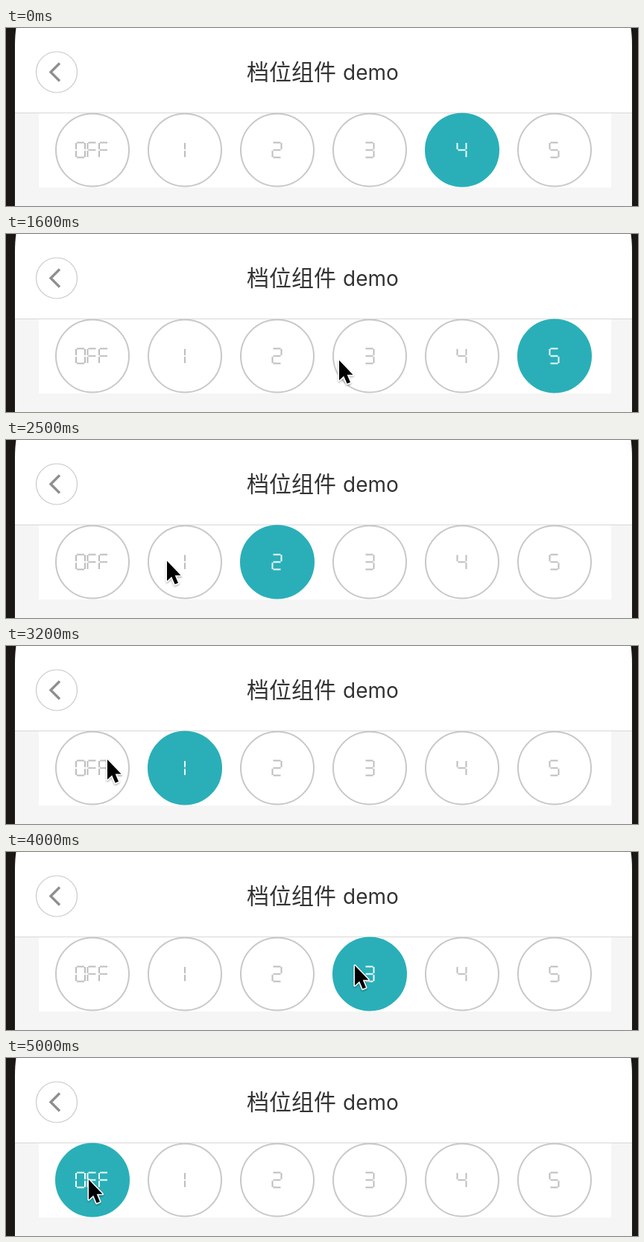
An HTML page for the animation above (5300 ms loop, 848 px wide and 240 px high).

```html
<!DOCTYPE html>
<html lang="zh">
<head>
<meta charset="utf-8">
<title>档位组件 demo</title>
<style>
html, body { margin: 0; width: 100%; height: 100%; overflow: hidden; background: #1a1715; }
svg { display: block; width: 100%; height: 100%; }
.cjk { font: 30px "Noto Sans CJK SC", "Noto Sans CJK", sans-serif; }
.latin { font: 28px Inter, Roboto, sans-serif; }
.gear circle { fill: #fff; stroke: #c8c8c8; stroke-width: 2; }
.gear path { fill: none; stroke: #bdbdbd; stroke-width: 2; }
.gear.on circle { fill: #2aafb8; stroke: #2aafb8; }
.gear.on path { stroke: #f2fbfb; }
</style>
</head>
<body>
<svg viewBox="0 0 848 240">
  <defs>
    <filter id="soft" x="-50%" y="-50%" width="200%" height="200%">
      <feDropShadow dx="0" dy="1.5" stdDeviation="1.3" flood-color="#000" flood-opacity=".35"/>
    </filter>
  </defs>
  <path d="M13.5 0Q12 10 12 24V240H840V24Q840 10 838.5 0Z" fill="#fff"/>
  <rect x="12" y="115" width="828" height="125" fill="#f5f5f5"/>
  <rect x="44" y="115" width="768" height="100" fill="#fff"/>
  <rect x="12" y="114" width="828" height="1" fill="#d8d8d8"/>
  <circle cx="68" cy="59.5" r="27.5" fill="#fff" stroke="#c9c9c9" stroke-width="1.2"/>
  <path d="M72 47.5L60 59.5L72 71.5" fill="none" stroke="#8f8f8f" stroke-width="3.4"/>
  <g fill="#333">
    <text class="cjk" x="323" y="70">档位组件</text>
    <text class="latin" x="452" y="70">demo</text>
  </g>
  <g id="gears"></g>
  <g id="pointer">
    <circle id="ring" cy="2" r="43" fill="none" stroke="#000" stroke-width="3"/>
    <path d="M1 1V28L7.2 22.2L11.6 32.6L16 30.7L11.7 20.6H19.5Z" fill="#000" stroke="#fff"
      stroke-width="3" paint-order="stroke" stroke-linejoin="round" filter="url(#soft)"/>
  </g>
</svg>
<script>
const LOOP = 5300, STEP = 100;
const el = id => document.getElementById(id);

// Seven-segment strokes in a 12 x 20 cell
const SEGMENTS = {
  a: 'M1 0H11', b: 'M12 .5V9', c: 'M12 11V19.5', d: 'M1 20H11',
  e: 'M0 11V19.5', f: 'M0 .5V9', g: 'M1 10H11'
};
const GLYPHS = { O: 'abcdef', F: 'aefg', 1: 'bc', 2: 'abged', 3: 'abgcd', 4: 'fgbc', 5: 'afgcd' };
const LABELS = ['OFF', '1', '2', '3', '4', '5'];
const PITCH = 15.5;

function glyph(ch, x) {
  const d = [...GLYPHS[ch]].map(s => SEGMENTS[s]).join('');
  return `<path transform="translate(${x} 154.5)" d="${d}"/>`;
}

el('gears').innerHTML = LABELS.map((label, i) => {
  const cx = 116 + i * 124;
  const width = (label.length - 1) * PITCH + 12;
  const left = label === '1' ? cx - 12 : cx - width / 2 - .5;
  const text = [...label].map((ch, k) => glyph(ch, left + k * PITCH)).join('');
  return `<g class="gear"><circle cx="${cx}" cy="164.5" r="49"/>${text}</g>`;
}).join('');
const gears = [...document.querySelectorAll('.gear')];

// Pointer moves: start, end, target x, target y, sag
const ENTER = 500, START = [820, 9];
const MOVES = [
  [500, 1000, 749, 164, 0],
  [1300, 1750, 340, 164, 6],
  [2100, 2500, 215, 162, 0],
  [3100, 3200, 135, 152, 0],
  [3200, 3600, 463, 153, 0],
  [3800, 4000, 467, 152, 0],
  [4100, 4700, 110, 163, 0]
];
// Presses: time, gear index
const CLICKS = [[1200, 5], [1800, 2], [2800, 1], [3700, 3], [4800, 0]];

function pointerAt(t) {
  let [x, y] = START;
  for (const [t0, t1, tx, ty, sag] of MOVES) {
    if (t <= t0) break;
    const u = Math.min(1, (t - t0) / (t1 - t0));
    const s = u * u * (3 - 2 * u);
    x += (tx - x) * s;
    y += (ty - y) * s + sag * Math.sin(Math.PI * u);
  }
  return [x, y];
}

function draw(ms) {
  const t = Math.floor((ms % LOOP) / STEP) * STEP;
  let active = 4, pressed = false;
  for (const [at, gear] of CLICKS) {
    if (t >= at + 100) active = gear;
    if (t >= at && t < at + 200) pressed = true;
  }
  gears.forEach((g, i) => g.classList.toggle('on', i === active));
  const [x, y] = pointerAt(t);
  el('pointer').setAttribute('transform', `translate(${x.toFixed(1)} ${y.toFixed(1)})`);
  el('pointer').style.display = t < ENTER ? 'none' : '';
  el('ring').style.display = pressed ? '' : 'none';
}

const begin = performance.now();
function tick() {
  draw(performance.now() - begin);
  requestAnimationFrame(tick);
}
tick();
</script>
</body>
</html>
```
